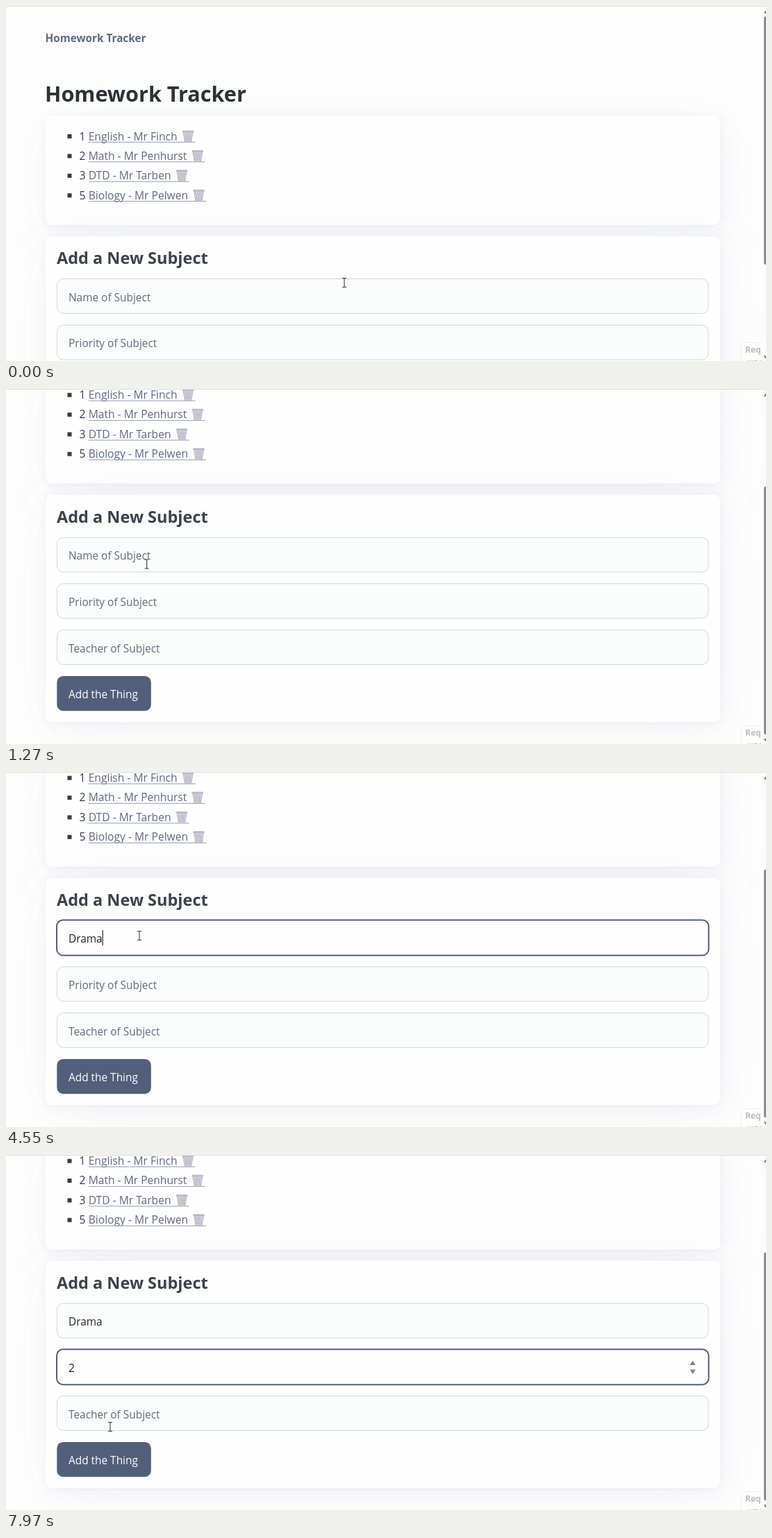
Recreate the animation shown at these times as an HTML page. Size 1094x512 px, loop 8000 ms.

```html
<!DOCTYPE html>
<html lang="en">
<head>
<meta charset="utf-8">
<title>Homework Tracker</title>
<style>
  html, body { margin: 0; width: 100%; height: 100%; overflow: hidden; background: #fefefe; }
  #stage { position: relative; width: 1094px; height: 512px; overflow: hidden; }
  #page, svg { position: absolute; left: 0; top: 0; }
  svg { overflow: visible; font: 15.4px "Open Sans", "Noto Sans", sans-serif; }
  .card {
    position: absolute; left: 57px; width: 971px; border-radius: 9px; background: #fefefe;
    box-shadow: 0 1px 6px rgba(129,145,181,.03), 1px 2px 12px rgba(129,145,181,.03),
      2px 4px 22px rgba(129,145,181,.036), 3px 7px 40px rgba(129,145,181,.043),
      8px 16px 96px rgba(129,145,181,.06), 0 0 0 1px rgba(129,145,181,.015);
  }
  .bold { font-weight: 700; }
  .ink { fill: #373c44; }
  .item { font-size: 15.6px; }
  .link { fill: #5d6984; }
  .hint { fill: #646b79; }
  .typed { fill: #23262c; }
  .option { font-size: 10.2px; font-weight: 600; fill: #24262b; }
</style>
</head>
<body>
<div id="stage">
  <div id="page">
    <div class="card" style="top:158px;height:158px"></div>
    <div class="card" style="top:332px;height:328px"></div>
    <svg width="1094" height="700">
      <text class="bold" x="56.5" y="52" font-size="15.3" fill="#5d6984">Homework Tracker</text>
      <text class="bold" x="56" y="137.5" font-size="30.6" fill="#2d3138">Homework Tracker</text>
      <g id="list"></g>
      <text class="bold" x="73" y="372" font-size="23.5" fill="#3d424d">Add a New Subject</text>
      <g id="fields"></g>
      <g id="spinner" fill="#7d818a">
        <path d="M984.5 482.5L988.5 476L992.5 482.5Z"/>
        <path d="M984.5 489L988.5 495.5L992.5 489Z"/>
      </g>
      <rect x="73.3" y="593.3" width="135.5" height="50.3" rx="9" fill="#525f7a"/>
      <text x="90" y="625.5" fill="#fff">Add the Thing</text>
      <rect id="caret" width="1.2" height="22" class="typed"/>
    </svg>
  </div>
  <svg width="1094" height="512">
    <rect width="1094" height="1" fill="#dedee0"/>
    <g id="menu">
      <rect id="menuBox" x="153" y="271.5" width="126" rx="4" fill="#fefefe" stroke="#dcdde1"
        style="filter:drop-shadow(0 1px 1.5px rgba(0,0,0,.16))"/>
      <path d="M165 272L171.5 266L178 272" fill="#fefefe" stroke="#eeeff2" stroke-width=".7"/>
      <g id="options"></g>
    </g>
    <rect x="1058" y="485.5" width="40" height="40" rx="3" fill="#fdfdfd" stroke="#efeff2"/>
    <g class="bold" font-size="12" fill="#bbbdc6">
      <text x="1064" y="500">Req</text>
      <text x="1067" y="520">URL</text>
    </g>
    <rect x="1089" y="1" width="5" height="511" fill="#fcfcfc"/>
    <path d="M1090.5 10.5L1094.5 5.5V10.5ZM1090.5 504.5H1094.5V509.5Z" fill="#7f7f7f"/>
    <rect id="thumb" x="1091" width="8" height="358" rx="3" fill="#8b8b8b"/>
    <path id="pointer" d="M-3 -6.5H-1L0 -5.5L1 -6.5H3M0 -5.5V5.5M-3 6.5H-1L0 5.5L1 6.5H3"
      fill="none" stroke="#3c3e44" stroke-width="1.1"/>
  </svg>
</div>
<script>
const LOOP = 8000, BLINK = 530, MENU_DELAY = 90;
const MAX_SCROLL = 179.4;
const NAME_CLICK = 1740, PRIORITY_CLICK = 5570;
const FIELD = { top: 393, pitch: 66.7, height: 50.4 };

const $ = id => document.getElementById(id);
const clamp = k => Math.max(0, Math.min(1, k));
const easeOut = k => 1 - (1 - k) ** 3;
const mix = (a, b, k) => `rgb(${a.map((v, i) => Math.round(v + (b[i] - v) * k))})`;
const show = (node, visible) => { node.style.display = visible ? "" : "none"; };

function setAttrs(node, attrs) {
  for (const key in attrs) node.setAttribute(key, attrs[key]);
}

function add(parent, tag, attrs, text = "") {
  const node = document.createElementNS("http://www.w3.org/2000/svg", tag);
  setAttrs(node, attrs);
  node.textContent = text;
  return parent.appendChild(node);
}

// Progress from 0 to 1 in even jumps, the first at start and the last at end.
function stepped(t, start, end, steps) {
  if (t < start) return 0;
  const done = Math.floor((t - start) / (end - start) * (steps - 1)) + 1;
  return Math.min(done, steps) / steps;
}

const moves = [
  { start: 160, end: 230, steps: 2, to: [313, 424] },
  { start: 990, end: 1550, steps: 9, to: [192, 236] },
  { start: 5180, end: 5510, steps: 6, to: [176, 305] },
  { start: 7700, end: 7970, steps: 5, to: [150, 392] }
];

function pointerAt(t) {
  return moves.reduce((from, { start, end, steps, to }) => {
    const k = easeOut(stepped(t, start, end, steps));
    return from.map((v, i) => v + (to[i] - v) * k);
  }, [487, 399]);
}

// Runs of evenly spaced keys; "<" is a backspace.
const nameKeys = [
  { start: 2510, gap: 0, keys: "D" },
  { start: 2780, gap: 160, keys: "rana" },
  { start: 4070, gap: 120, keys: "<<" },
  { start: 4410, gap: 140, keys: "ma" }
];
const priorityKeys = [{ start: 7040, gap: 0, keys: "2" }];

function typeText(runs, t, clicked) {
  let text = "", lastKey = clicked;
  for (const { start, gap, keys } of runs) {
    [...keys].forEach((key, i) => {
      const time = start + gap * i;
      if (time > t) return;
      text = key === "<" ? text.slice(0, -1) : text + key;
      if (key !== "<") lastKey = time;
    });
  }
  return { text, lastKey };
}

function drawBin(x, y) {
  const bin = add($("list"), "g", { transform: `translate(${x} ${y})`, stroke: "#b3b2bf" });
  add(bin, "path", { d: "M1.5 2L4 16.5H13L15.5 2Z", fill: "#d6d5de" });
  for (let i = 0; i < 3; i++) {
    const left = 4 + 3 * i;
    add(bin, "path", { d: `M${left} 4L${left + 2.5} 15M${left + 3} 4L${left + .5} 15`, "stroke-width": .8 });
  }
  add(bin, "rect", { x: .5, y: .5, width: 16, height: 2, rx: 1, fill: "#c0bfcb", "stroke-width": .8 });
}

const subjects = [
  [1, "English - Mr Finch"], [2, "Math - Mr Penhurst"], [3, "DTD - Mr Tarben"], [5, "Biology - Mr Pelwen"]
];
subjects.forEach(([number, label], i) => {
  const x = 118.7, y = 193.5 + 28.4 * i;
  add($("list"), "rect", { x: 88.5, y: y - 8.5, width: 6, height: 6, class: "ink" });
  add($("list"), "text", { x: 105.5, y, class: "item ink" }, number);
  const width = add($("list"), "text", { x, y, class: "item link" }, label).getComputedTextLength();
  add($("list"), "rect", { x, y: y + 2.3, width: width + 26, height: 1.2, fill: "#a5adbd" });
  drawBin(x + width + 7, y - 14);
});

const fields = ["Name", "Priority", "Teacher"].map((word, i) => {
  const top = FIELD.top + FIELD.pitch * i;
  return {
    top,
    hint: word + " of Subject",
    box: add($("fields"), "rect", { rx: 9 }),
    label: add($("fields"), "text", { x: 90, y: top + 32.6 })
  };
});

const options = ["English", "Math", "Biology", "DTD"].map(word =>
  add($("options"), "text", { x: 162.5, class: "option" }, word));

function updateField({ box, label, top, hint }, value, focus) {
  setAttrs(box, {
    x: 73.5 - focus / 2, y: top + .5 - focus / 2,
    width: 937.5 + focus, height: FIELD.height - .5 + focus,
    fill: mix([251, 252, 252], [254, 254, 254], focus),
    stroke: mix([207, 213, 226], [82, 95, 122], focus),
    "stroke-width": 1 + focus
  });
  label.textContent = value || hint;
  label.setAttribute("class", value ? "typed" : "hint");
}

function updateCaret(field, { text, lastKey }, t) {
  show($("caret"), t >= lastKey && Math.floor((t - lastKey) / BLINK) % 2 === 0);
  const width = text ? field.label.getComputedTextLength() : 0;
  setAttrs($("caret"), { x: 90 + width, y: field.top + 14.6 });
}

function updateMenu(open, prefix) {
  let count = 0;
  for (const option of options) {
    const match = option.textContent.startsWith(prefix);
    show(option, match);
    if (match) option.setAttribute("y", 294 + 29 * count++);
  }
  show($("menu"), open && count > 0);
  $("menuBox").setAttribute("height", 7 + 29 * count);
}

function render(t) {
  const scroll = MAX_SCROLL * stepped(t, 490, 790, 5);
  const [x, y] = pointerAt(t);
  const name = typeText(nameKeys, t, NAME_CLICK);
  const priority = typeText(priorityKeys, t, PRIORITY_CLICK);
  const fade = start => clamp((t - start) / 200);
  const blur = fade(PRIORITY_CLICK);
  const onPriority = t >= PRIORITY_CLICK;
  const overPriority = Math.abs(y + scroll - fields[1].top - FIELD.height / 2) < FIELD.height / 2;

  $("page").style.transform = `translateY(${-scroll}px)`;
  $("thumb").setAttribute("y", 15 + .7 * scroll);
  $("pointer").setAttribute("transform", `translate(${x} ${y})`);
  updateField(fields[0], name.text, fade(NAME_CLICK + 100) - blur);
  updateField(fields[1], priority.text, blur);
  updateField(fields[2], "", 0);
  updateCaret(fields[+onPriority], onPriority ? priority : name, t);
  updateMenu(t >= NAME_CLICK && !onPriority, typeText(nameKeys, t - MENU_DELAY, 0).text);
  show($("spinner"), onPriority || overPriority);
}

const start = performance.now();
function tick() {
  render((performance.now() - start) % LOOP);
  requestAnimationFrame(tick);
}
tick();
</script>
</body>
</html>
```
